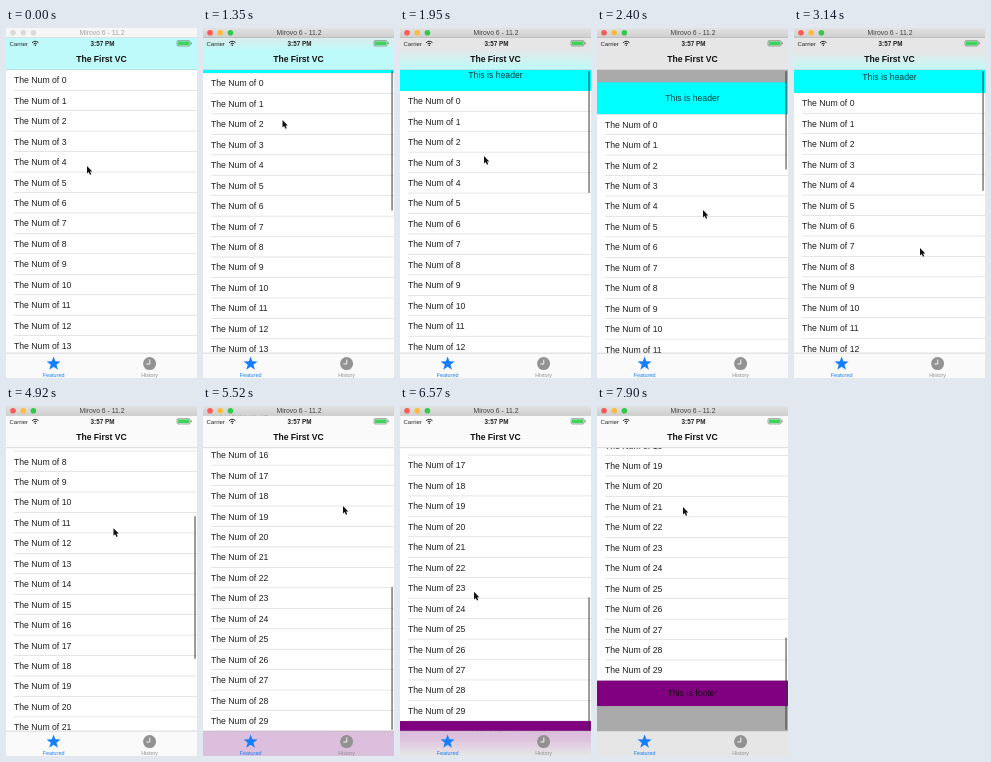
These frames come from a looping animation (191 by 350 pixels, 8000 ms). An HTML page with a canvas:

```html
<!DOCTYPE html>
<html lang="en">
<head>
<meta charset="utf-8">
<title>Table header and footer</title>
<style>
html, body { margin: 0; width: 100%; height: 100%; overflow: hidden; background: #fff; }
canvas { display: block; width: 191px; height: 350px; }
</style>
</head>
<body>
<canvas id="stage"></canvas>
<script>
const W = 191, H = 350, LOOP = 8000;
const NAV = 42, TAB = 325, ROW = 20.45, ROWS = 30;
const HEADER = 32, FOOTER = 25.4, MAX = 330.3;
const FONT = '"Liberation Sans", Arial, sans-serif';
const CYAN = [0, 255, 255], PURPLE = [128, 0, 128], GREY = [170, 170, 170], WHITE = [255, 255, 255];

const canvas = document.getElementById('stage');
const ctx = canvas.getContext('2d');
const dpr = window.devicePixelRatio || 1;
canvas.width = W * dpr;
canvas.height = H * dpr;

// Pointer path: time, x, y
const pointer = [
  [0, 81, 138], [150, 80, 118], [300, 79, 97], [450, 79, 85], [1200, 79, 86],
  [1500, 80, 98], [1950, 84, 128], [2100, 88, 139], [2400, 106, 182], [2700, 126, 220],
  [3140, 126, 220], [3590, 108, 202], [4030, 85, 177], [4330, 85, 176],
  [4630, 98, 134], [5000, 122, 104], [5520, 140, 100], [5820, 108, 150],
  [6120, 74, 204], [6420, 74, 204], [6560, 74, 186], [6860, 80, 132],
  [7150, 86, 102], [7890, 86, 102], [7900, 86, 101]
];
const release = [[3000, -50], [3140, -23], [3290, -8], [3440, -2], [3590, 0], [4180, 0], [4330, 1.4]];
const flick = [
  [4330, 1.4], [4480, 38], [4630, 96], [4780, 162], [4930, 225],
  [5075, 275], [5225, 309], [5370, 326], [5520, MAX]
];
const barAlpha = [
  [1200, 0], [1350, 1], [3440, 1], [3740, 0], [4320, 0], [4330, 1],
  [5520, 1], [5820, 0], [6420, 0], [6560, 1]
];

function track(keys, t, col = 1) {
  if (t <= keys[0][0]) return keys[0][col];
  for (let i = 1; i < keys.length; i++) {
    const a = keys[i - 1], b = keys[i];
    if (t <= b[0]) return a[col] + (b[col] - a[col]) * (t - a[0]) / (b[0] - a[0]);
  }
  return keys[keys.length - 1][col];
}

function hold(t) {
  if (t < 3140) return Math.min(3000, Math.floor(t / 150) * 150);
  return 3140 + Math.floor((t - 3140) / 148.75) * 148.75;
}

function rubber(d) {
  const view = 341;
  return view * (1 - 1 / (Math.max(0, d) * 0.55 / view + 1));
}

function scrollAt(t) {
  if (t < 1200) return 0;
  if (t < 3000) return -rubber(track(pointer, t, 2) - 86) * 0.97;
  if (t < 4330) return track(release, t);
  if (t < 6420) return track(flick, t);
  return MAX + rubber(204 - track(pointer, t, 2)) * 1.04;
}

function rect(x, y, w, h, fill) {
  ctx.fillStyle = fill;
  ctx.fillRect(x, y, w, h);
}

function disc(x, y, r, fill) {
  ctx.fillStyle = fill;
  ctx.beginPath();
  ctx.arc(x, y, r, 0, Math.PI * 2);
  ctx.fill();
}

function label(text, x, y, size, fill, align = 'left', weight = 400) {
  ctx.font = `${weight} ${size}px ${FONT}`;
  ctx.textAlign = align;
  ctx.textBaseline = 'alphabetic';
  ctx.fillStyle = fill;
  ctx.fillText(text, x, y + size * 0.35);
}

const rgb = c => `rgb(${c.map(Math.round).join(',')})`;

function contentColor(y, s) {
  const top = NAV - s, end = top + ROWS * ROW;
  if (y < top - HEADER) return GREY;
  if (y < top) return CYAN;
  if (y < end) return WHITE;
  return y < end + FOOTER ? PURPLE : GREY;
}

// Translucent bar: a soft average of whatever lies beneath
function glass(y0, y1, s) {
  const grad = ctx.createLinearGradient(0, y0, 0, y1);
  const stops = 10;
  for (let i = 0; i <= stops; i++) {
    const y = y0 + (y1 - y0) * i / stops;
    const sum = [0, 0, 0];
    let n = 0;
    for (let d = -9; d <= 9; d++) {
      const under = contentColor(Math.min(y1 - 0.5, Math.max(y0 + 0.5, y + d)), s);
      under.forEach((v, k) => { sum[k] += v; });
      n++;
    }
    grad.addColorStop(i / stops, rgb(sum.map(v => 248 * 0.77 + v / n * 0.23)));
  }
  rect(0, y0, W, y1 - y0, grad);
}

function table(s) {
  const top = NAV - s, end = top + ROWS * ROW;
  rect(0, 0, W, H, rgb(GREY));
  rect(0, top - HEADER, W, HEADER, rgb(CYAN));
  label('This is header', 95.5, top - HEADER / 2, 8.66, '#063c3c', 'center');
  rect(0, top, W, ROWS * ROW, '#fff');
  for (let i = 0; i < ROWS; i++) {
    const y = top + i * ROW;
    if (y > H || y + ROW < 0) continue;
    label('The Num of ' + i, 8, y + ROW / 2, 8.66, '#1c1c1c');
    rect(8, y + ROW - 0.5, W - 8, 0.6, '#d4d4d6');
  }
  rect(0, end, W, FOOTER, rgb(PURPLE));
  label('This is footer', 95.5, end + FOOTER / 2, 8.66, '#14000f', 'center');
}

function indicator(t, s) {
  const over = Math.max(0, -s, s - MAX);
  const len = 143 - over;
  const y = 43 + (281 - len) * Math.min(1, Math.max(0, s / MAX));
  ctx.globalAlpha = track(barAlpha, t) * 0.65;
  ctx.fillStyle = '#333';
  ctx.beginPath();
  ctx.roundRect(188.3, y, 1.5, len, 0.75);
  ctx.fill();
  ctx.globalAlpha = 1;
}

function navBar(s) {
  glass(9.5, NAV, s);
  rect(0, NAV - 0.4, W, 0.5, '#b4b8b8');
  label('Carrier', 3.5, 15.4, 6, '#222');
  ctx.strokeStyle = '#222';
  ctx.lineWidth = 1;
  for (const r of [2.3, 4.2]) {
    ctx.beginPath();
    ctx.arc(29.3, 17.5, r, -Math.PI * 0.78, -Math.PI * 0.22);
    ctx.stroke();
  }
  disc(29.3, 17.2, 0.8, '#222');
  label('3:57 PM', 96.5, 15.4, 6.3, '#222', 'center', 700);
  ctx.lineWidth = 0.5;
  ctx.strokeStyle = '#555';
  ctx.beginPath();
  ctx.roundRect(171, 12.6, 13, 5.4, 1.2);
  ctx.stroke();
  rect(171.8, 13.4, 11.4, 3.8, '#3fd35b');
  rect(184.7, 14.4, 0.8, 1.8, '#555');
  label('The First VC', 95.5, 31.4, 8.6, '#111', 'center', 700);
}

function tabBar(s) {
  glass(TAB, H, s);
  rect(0, TAB - 0.2, W, 0.5, '#b4b4b4');
  ctx.fillStyle = '#157efb';
  ctx.beginPath();
  for (let i = 0; i < 10; i++) {
    const a = -Math.PI / 2 + i * Math.PI / 5, r = i % 2 ? 3 : 7.4;
    ctx.lineTo(47.6 + r * Math.cos(a), 335.8 + r * Math.sin(a));
  }
  ctx.fill();
  label('Featured', 47.6, 347.4, 5.4, '#157efb', 'center');
  disc(143.6, 335.6, 6.5, '#929292');
  ctx.strokeStyle = '#f4f4f4';
  ctx.lineWidth = 1;
  ctx.beginPath();
  ctx.moveTo(143.8, 331.5);
  ctx.lineTo(143.8, 336);
  ctx.lineTo(140.4, 336);
  ctx.stroke();
  label('History', 143.6, 347.4, 5.4, '#8e8e8e', 'center');
}

function titleBar(active) {
  const grad = ctx.createLinearGradient(0, 0, 0, 9.5);
  grad.addColorStop(0, active ? '#e2e2e2' : '#f6f6f6');
  grad.addColorStop(1, active ? '#cecece' : '#f6f6f6');
  rect(0, 0, W, 9.5, grad);
  rect(0, 9.1, W, 0.4, active ? '#b0b0b0' : '#dcdcdc');
  const lights = active ? ['#fc5b57', '#fdbc40', '#34c84a'] : ['#dadada', '#dadada', '#dadada'];
  lights.forEach((c, i) => disc(7 + i * 10.2, 4.7, 2.8, c));
  label('Mirovo 6 - 11.2', 96, 4.7, 6.8, active ? '#444' : '#a4a4a4', 'center');
}

function arrow(x, y) {
  ctx.save();
  ctx.translate(x, y);
  ctx.beginPath();
  for (const [px, py] of [[0, 0], [0, 7.6], [1.7, 6.1], [2.9, 8.8], [4.2, 8.2], [3.1, 5.6], [5.3, 5.4]]) {
    ctx.lineTo(px, py);
  }
  ctx.closePath();
  ctx.lineWidth = 1;
  ctx.strokeStyle = '#fff';
  ctx.stroke();
  ctx.fillStyle = '#111';
  ctx.fill();
  ctx.restore();
}

function draw(now) {
  const t = hold(now % LOOP), s = scrollAt(t);
  ctx.setTransform(dpr, 0, 0, dpr, 0, 0);
  table(s);
  indicator(t, s);
  navBar(s);
  tabBar(s);
  titleBar(t >= 1200);
  arrow(track(pointer, t, 1), track(pointer, t, 2));
}

const start = performance.now();
function tick() {
  draw(performance.now() - start);
  requestAnimationFrame(tick);
}
tick();
</script>
</body>
</html>
```
